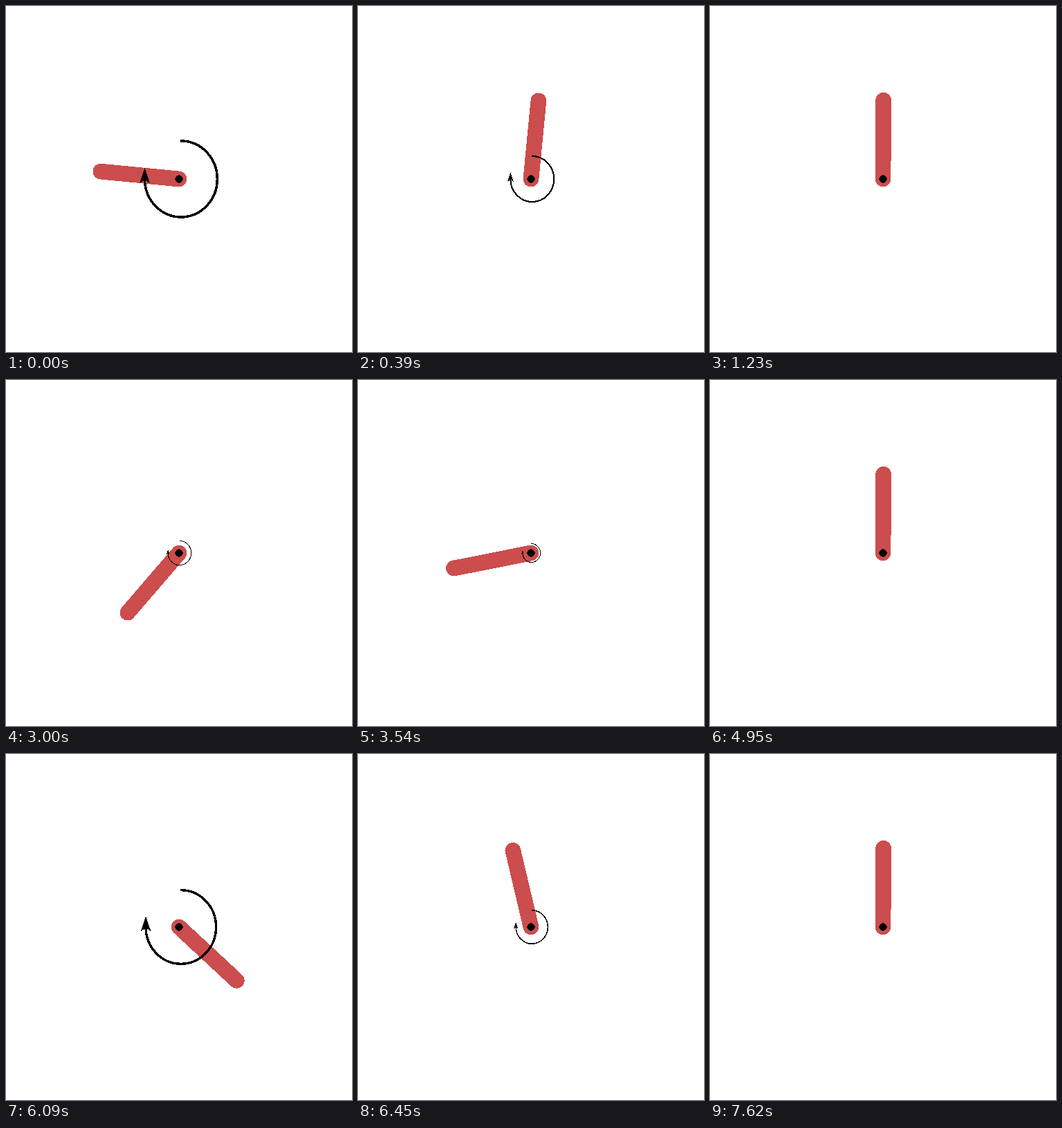
Recreate the animation shown at these times as an HTML page. Size 500 by 500 pixels, loop 8 s.

```html
<!DOCTYPE html>
<html lang="en">
<head>
<meta charset="utf-8">
<title>Pendulum swing-up</title>
<style>
  html, body { margin: 0; width: 100%; height: 100%; overflow: hidden; background: #fff; }
  svg { display: block; width: 100%; height: 100%; shape-rendering: crispEdges; }
</style>
</head>
<body>
<svg viewBox="-250 -250 500 500">
  <line id="rod" y2="-113.64" stroke="#cc4d4d" stroke-width="22.73" stroke-linecap="round"/>
  <g id="arrow">
    <path id="arc" d="M2 -55H2.9A52.4 55 0 1 1 -49.5 0V-4" fill="none" stroke="#000"/>
    <path d="M-49.5 -16L-41.8 6.5L-49.5 1L-57 6.5Z"/>
  </g>
  <circle r="5.7"/>
</svg>
<script>
const LOOP = 8000, STEP = 30, RUN_STEPS = 100;
const REST = -0.34; // final tilt in degrees

// Key poses of each swing-up: [step, degrees counter-clockwise from upright, torque].
// After the last one the rod settles exponentially.
const runs = [
  { settle: 0.5, keys: [[0, -275.5, -2], [2, -250.5, 2], [5, -144.5, 1.4], [8, -52.5, 0.5],
                        [10, -26.5, 0], [13, -5.5, -1.2]] },
  { settle: 0.25, keys: [[0, 139.3, -0.64], [4, 173, 2], [7, 241, 2], [11, 275.5, -0.8], [14, 240.5, -2],
                         [18, 101.2, -0.49], [21, 40.5, -0.75], [23, 24.5, -0.95], [26, 13.3, -0.88]] },
  { settle: 0.25, keys: [[0, 253, -0.6], [2, 246, -2], [4, 200, -1.6], [7, 97.5, -0.49],
                         [10, 39, -0.75], [12, 23.7, -0.95], [15, 13.3, -0.88]] }
];

// Smooth curve through column c of the keys, starting at rest.
function spline(keys, k, c) {
  const i = keys.findIndex(key => key[0] > k) - 1;
  const slope = j => {
    if (j === 0) return 0;
    const a = keys[j - 1], b = keys[j + 1] || keys[j];
    return (b[c] - a[c]) / (b[0] - a[0]);
  };
  const p = keys[i], q = keys[i + 1], d = q[0] - p[0], t = (k - p[0]) / d;
  return p[c] + (q[c] - p[c]) * t * t * (3 - 2 * t)
    + d * t * (1 - t) * (slope(i) * (1 - t) - slope(i + 1) * t);
}

function pose(step) {
  const { keys, settle } = runs[Math.floor(step / RUN_STEPS)];
  const k = step % RUN_STEPS, [end, angle, torque] = keys[keys.length - 1];
  if (k < end) return [spline(keys, k, 1), spline(keys, k, 2)];
  const fade = Math.exp(-settle * (k - end));
  return [REST + (angle - REST) * fade, torque * fade];
}

const [rod, arrow, arc] = ["rod", "arrow", "arc"].map(id => document.getElementById(id));

function draw() {
  const time = performance.now() % LOOP;
  const [angle, torque] = pose(Math.floor(time / STEP));
  const size = Math.max(Math.abs(torque) / 2, 0.001);
  rod.setAttribute("transform", `rotate(${-angle})`);
  arrow.setAttribute("transform", `scale(${torque > 0 ? -size : size} ${size})`);
  arc.setAttribute("stroke-width", Math.max(3.5, 1 / size));
  requestAnimationFrame(draw);
}
draw();
</script>
</body>
</html>
```
